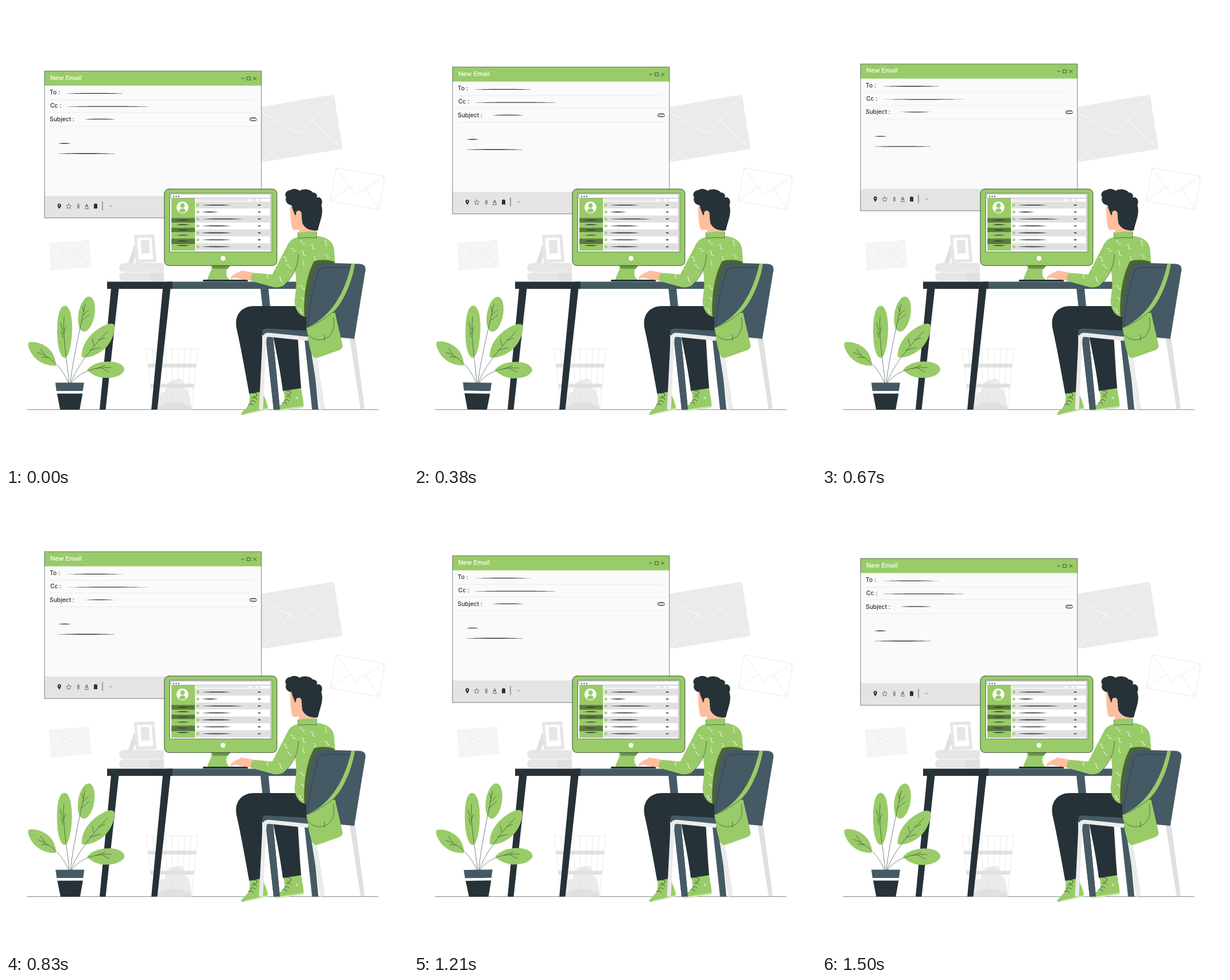
Recreate the animation shown at these times as an HTML page. Size 700 px wide and 800 px high, loop 1.54 s.

```html
<!DOCTYPE html>
<html lang="en">
<head>
<meta charset="utf-8">
<title>New email</title>
<style>
html, body { margin: 0; width: 100%; height: 100%; overflow: hidden; background: #fff; }
svg { display: block; width: 700px; height: 800px; }
text { font-family: Inter, "Open Sans", sans-serif; font-size: 10.3px; font-weight: 500; fill: #263238; }
.g { fill: #99cb68; }
.d { fill: #263238; }
.s { fill: #455a64; }
.sh { fill: #4c6534; }
.skin { fill: #ffbe9d; }
.w { fill: #fff; }
.l1 { fill: #ebebeb; }
.l2 { fill: #e0e0e0; }
.l3 { fill: #e6e6e6; }
.ln { fill: none; stroke: #263238; stroke-width: .8; stroke-linecap: round; stroke-linejoin: round; }
.thin { stroke-width: .6; }
.wl { fill: none; stroke: #fff; stroke-width: .9; stroke-linecap: round; }
.gl { fill: none; stroke: #e4e4e4; stroke-width: .8; }
</style>
</head>
<body>
<svg viewBox="0 0 700 800" xmlns="http://www.w3.org/2000/svg">
  <!-- floor -->
  <path class="ln thin" d="M37 703.400H648"/>

  <!-- envelopes -->
  <path class="l1" d="M431 178L571 154.500L586 249L446 272Z"/>
  <path class="wl" d="M431 178L512 222.500L571 155M446 272L495 212M586 249L532 199"/>
  <path class="gl" d="M575 282L659 297L650 355L565 340ZM575 282L608.500 328.500L659 297M565 340L599 315M650 355L627 319"/>
  <path fill="#f5f5f5" d="M75 413L144.500 407.500L149 455L78 461Z"/>
  <path class="gl" d="M75 413L114 433.500L144.500 407.500M78 461L102 428M149 455L122 428"/>

  <!-- books and picture frame -->
  <path class="l2" d="M223 417L213 448H221L228 430Z"/>
  <path class="l3" d="M223 399L258 398L262 446L226 448Z"/>
  <path class="w" d="M228 404.500L253 403.500L256.500 441L231 442Z"/>
  <path class="l3" d="M234.500 408.500L249 407.500L250.500 431L236 432Z"/>
  <path class="l3" d="M275 448H204Q197 449 197 456T204 463.500H275Z"/>
  <path class="l3" d="M275 464.500H204Q197 465 197 472T204 479.500H275Z"/>
  <path class="l2" d="M275 464.500H254Q248 466 248 472T254 479.500H275Z"/>

  <!-- bin -->
  <path class="l1" d="M264 703C262 684 266 672 277 672C277 659 286 650 296 651C306 645 313 659 312 667C321 672 322 688 323 703Z"/>
  <path class="l2" d="M265 703C266 694 276 690 285 691C300 688 316 692 322 703Z"/>
  <path id="bars" class="gl"/>
  <path class="l2" d="M247 623.500H331.500L331 630H248ZM251 658.500H327.500L327 665H252ZM256 697H322.500L322 703.500H257Z"/>

  <!-- message window -->
  <g id="win">
    <path fill="#fafafa" d="M67 113.500H445V369.500H67Z"/>
    <path fill="#e4e4e4" d="M67 331H445V369.500H67Z"/>
    <path class="g" d="M67 113.500H445V139H67Z"/>
    <path class="ln thin" d="M67.400 113.500H444.700V369.500H67.400Z"/>
    <path class="gl" style="stroke:#e8e8e8" d="M76 163.500H432M76 185.600H440M76 209.600H438"/>
    <text x="77" y="129" style="fill:#fff;font-size:11px">New Email</text>
    <text x="76" y="154.200">To :</text>
    <text x="77" y="177.600">Cc :</text>
    <text x="76" y="201">Subject :</text>
    <g id="lines"></g>
    <path class="ln" d="M410 126.500H414.500M420 123.800H425.500V129.200H420ZM430.500 124L436 129.200M436 124L430.500 129.200"/>
    <path class="ln" d="M434.500 199.500H428Q426 199.200 426 197.700T428 196H434Q436.700 196.200 436.700 198T434 200.400H427Q424.300 200 424.300 197.500T427 194.800H435"/>
    <path class="d" fill-rule="evenodd" d="M92.800 354C90.500 350.500 89.700 349 89.700 347.700A3.100 3.100 0 0 1 95.900 347.700C95.900 349 95 350.500 92.800 354ZM92.800 346.500a1.200 1.200 0 1 0 .01 0Z"/>
    <path id="star" class="ln thin"/>
    <path class="ln thin" d="M124.600 347V352.500Q125.800 354.500 127.200 352.500V346Q125.800 343.500 124.500 346M126 347V351.500"/>
    <path class="ln" d="M138 351.300L140.500 345.200L143 351.300M139 349.200H142M137.500 353.400H143.800"/>
    <path class="d" d="M153 345.500H154.500V344.500H157.500V345.500H159V353.300H153Z"/>
    <path class="ln" d="M168 341.500V356" style="stroke:#555;stroke-width:1"/>
    <path class="ln thin" d="M180.200 348.300L182 349.700L183.800 348.300"/>
  </g>

  <!-- desk -->
  <path class="d" d="M183 492H196.500L173.500 703.500H163ZM273 492H286.500L263.500 703.500H253Z"/>
  <path class="s" d="M443 492H457L477 703.500H466ZM510 492H524L544 703.500H533Z"/>
  <path class="s" d="M280 480.500H524V493H280Z"/>
  <path class="d" d="M176 480.500H290V493H176Z"/>

  <!-- monitor -->
  <path class="g" d="M358 452H391C382 457 381 471 390 478H351C351 469 358 466 358 452Z"/>
  <path style="fill:#6d9449" d="M357 452H391L386 458H361Z"/>
  <path class="d" d="M343 477H421V480.300H343Z"/>
  <rect class="g" x="275.500" y="318.800" width="196.500" height="133.800" rx="8"/>
  <rect class="ln" x="275.800" y="319" width="196" height="133.400" rx="8"/>
  <circle class="w" cx="378" cy="439.700" r="4.200"/>
  <path class="w" d="M285.500 326.300H462.800V428.700H285.500Z"/>
  <path class="ln thin" d="M285.500 326.300H462.800V428.700H285.500Z"/>
  <path class="g" d="M288 335H329V426.500H288Z"/>
  <path class="ln" style="stroke-width:.4" d="M287.500 328H460.500V334.800H287.500ZM460.500 335V427"/>
  <path class="d" d="M291 332a1.100 1.100 0 1 0 2.200 0a1.100 1.100 0 1 0-2.200 0M295.200 332a1.100 1.100 0 1 0 2.200 0a1.100 1.100 0 1 0-2.200 0M299.400 332a1.100 1.100 0 1 0 2.200 0a1.100 1.100 0 1 0-2.200 0"/>
  <circle class="w" cx="307.300" cy="351" r="10.300"/>
  <path class="g" d="M303.300 347.800a4 4 0 1 1 8 0a4 4 0 1 1-8 0M301.500 358.500Q302 352.500 307.300 352.500T313 358.500Q307.500 361.500 301.500 358.500Z"/>
  <path fill="#5c7a3f" d="M288 369.500H329V377.500H288ZM288 386.500H329V394H288ZM288 405.500H329V415H288Z"/>
  <path class="l2" d="M331 336.500H422.500V339.500H331ZM427 336.500H435.500V339.500H427ZM439 336.500H443.500V339.500H439Z"/>
  <g id="rows"></g>

  <!-- legs and shoes -->
  <path class="g" d="M483 671L514 665C515 678 519 688 518 699L472 706Q466 704 472 699C486 692 487 685 483 671Z"/>
  <path class="g" d="M424 676L447 671C449 682 455 689 456 701L411 713Q407 711 413 706C424 697 425 690 424 676Z"/>
  <path fill="#cfe6b8" d="M408.500 712.500L456 700.500V703L432 709ZM466 704.500L518 697V700L476 706Z"/>
  <path class="ln" d="M430 675Q436 673 437 677T431 681M428 684Q432 679 437 686M426 690Q431 685 434 691M422 695Q428 691 430 696M489 671Q496 669 496 674T490 677M488 681Q492 677 496 683M485 688Q490 683 493 689M481 692Q486 688 489 694"/>
  <circle cx="506.500" cy="683" r="2" fill="#cfe6b8"/>
  <path class="d" d="M462 560L507 562C510 600 511 635 514 666L482 671C477 630 470 600 462 560Z"/>
  <path class="d" d="M525 523H432C409 523 397 540 401.500 562C410 600 417 640 423.500 676L448 671.500L446 573L525 568Z"/>
  <path class="ln thin" style="stroke:#44525a" d="M428 553Q437 562 449 566"/>
  <path class="s" d="M452 577H465L477 703.500H466Z"/>

  <!-- head -->
  <path class="skin" d="M495 340C494 362 496 383 499 389Q504 391.500 510.500 389L509.500 397L540 395L538 365L515 335Z"/>
  <path class="d" d="M497.500 347C489 347 485 338 488 334C484 328 488 321 495 321C500 317 508 319 511 322C519 317 531 320 534 325C541 325 544 332 540 334C548 331 553 339 549 347C554 361 546 376 543 391C530 393 519 387 515.500 377L514.500 362L504 368C503 362 498 353 497.500 347Z"/>
  <circle class="skin" cx="509.700" cy="361.500" r="4.800"/>
  <path class="skin" d="M503.500 364L514 362L516 379L503 378Z"/>

  <!-- shirt and hand -->
  <path class="skin" d="M430 464.500L410 461C402 466 393 468 391 474Q391 477 394 476L397 472.500Q397 475 401 473.500L411 476.500L429 478.500Z"/>
  <path class="g" d="M509 403L541 401C559 402 571 411 571.500 426L573 448L545 475L527 541C514 545 502 530 502.500 513C505 495 507 477 503 461C497 473 491 481 482 488Q475 491.500 466 490L426 479Q426 468 431 465L463.500 468L490 417C495 407 501 404 509 403Z"/>
  <path class="g" d="M508 395Q525 392 541 393.500L540.500 404Q525 403 509 405Z"/>
  <path class="ln thin" d="M508 395L509 404.500Q525 403 540.500 404L541 393.500M509.500 433C508 445 506 455 503 461C499 470 493 479 486 485"/>
  <g id="squig"></g>
  <path class="sh" d="M519.500 541C517 502 526 461 537 444.500Q555 440 573 446L545 470L527 544Z"/>

  <!-- chair and bag -->
  <path d="M535 598L551.500 703" stroke="#ebebeb" stroke-width="8.500"/>
  <path class="l2" d="M598.500 579H608L624.500 702L617.500 703Z"/>
  <path class="s" d="M446 568Q447 562 454 562L525 566V580L458 574L448 577Z"/>
  <path d="M526 580L457 573Q450 573 450 582L444 703" fill="none" stroke="#ebebeb" stroke-width="7"/>
  <path class="s" d="M523 563C522 522 531 472 539 456Q543 447 553 447.500L617 449.500Q627 451 626 460L606.500 580L572 577Z"/>
  <path class="ln thin" d="M526 561C526 528 536 493 541 472Q544 456 555 455.500L603 456M606 456C597 489 582 518 567 537"/>
  <path class="g" d="M601.500 449L607.500 449.500C602 484 586 519 568 535L573 534.500L586 591Q587 597 580 600L543 613Q536 615 533 608C528 594 526 583 526 575L523 561C565 543 590 501 601.500 449Z"/>
  <path class="ln thin" d="M526.500 573C536 583 551 585 562 576C570 569 573 557 570 543M554.500 572.500V582.500M523 561Q548 552 567 535"/>

  <!-- plant -->
  <g id="plant">
    <path class="g" d="M102 613.500C93 611 89 590 89 566C89 541 93 523 102 522.500C111 523 115.500 541 115 566C114 590 110 611 102 613.500Z"/>
    <ellipse class="g" cx="140" cy="537" rx="14" ry="31" transform="rotate(10 140 537)"/>
    <path class="g" d="M132 612C131 595 140 577 160 563C176 552 187 551 189 557C190 570 183 588 169 600C154 611 141 614 132 612Z"/>
    <path class="g" d="M87 627C69 628 52 619 44 605C38 595 37 587 41 586C56 584 75 593 82 607Q87 617 87 627Z"/>
    <path class="g" d="M141 634C151 622 169 618 187 620C201 622 207 629 206 635C202 644 188 649 170 648C158 647 147 641 141 634Z"/>
    <path class="ln thin" d="M110 657C107 620 98 580 101 542M99 578L96 566M99.500 572L104 560M98.500 565L94.500 552M112 657C116 620 127 570 138 519M131 549L145 538M134 539L144 529M135 533L133 524M113 657C122 631 148 596 177 567M146 600L164 595M153 591L150 580M161 582L172 578M109 657C99 634 82 613 55 604M74 613L62 612M68 609L60 598M114 657C130 636 154 629 183 630M158 632L172 626M167 631L180 638"/>
    <path class="s" d="M86 656.500H136L134 671H88Z"/>
    <path class="w" d="M88 671H134L133 676H89Z"/>
    <path class="d" d="M89 675.500H133.500L128.500 703.500H94.500Z"/>
  </g>
</svg>
<script>
const $ = id => document.getElementById(id);
const LOOP = 1540, LEAD = 55;

// A stroke that thins out towards both ends
const taper = (x1, x2, y, h = 0.9) => {
  const q = (x2 - x1) / 4;
  return `<path class="d" d="M${x1} ${y}C${x1 + q} ${y - h} ${x2 - q} ${y - h} ${x2} ${y}C${x2 - q} ${y + h} ${x1 + q} ${y + h} ${x1} ${y}Z"/>`;
};

$("lines").innerHTML = [
  [105, 205, 152.6], [105, 249, 175.4], [137, 190, 197.4], [91, 113, 239.7], [90, 191, 257.5]
].map(a => taper(...a)).join("");

$("rows").innerHTML = [393, 370, 414, 393, 392, 393, 393].map((end, i) => {
  const y = 347 + i * 12.1;
  const band = i % 2 ? "" : `<path class="l2" d="M329.500 ${y - 6}H459.500V${y + 6}H329.500Z"/>`;
  const box = `<rect class="g" x="332.300" y="${y - 2}" width="4" height="4"/>`;
  return band + box + taper(340, end, y, 1.1) + taper(438, 444, y, 1.2);
}).join("") + [373.3, 381.3, 390.3, 399.3, 409.6, 417.5].map(y => taper(296, 320, y)).join("");

$("squig").innerHTML = [
  [516, 412], [534, 420], [557, 413], [500, 425], [518, 431], [538, 441], [559, 436],
  [487, 441], [518, 448], [493, 454], [478, 476], [455, 470], [518, 511],
  [513, 531], [533, 459], [516, 490]
].map(([x, y], i) =>
  `<path class="wl" transform="translate(${x} ${y}) rotate(${i % 3 * 20})" d="M-4.500 -2C-2.500 -4 0 -3 0 0S2.500 4 4.500 2"/>`
).join("");

let bars = "M244 597H334L323 703H256Z";
for (let i = 1; i < 8; i++) bars += `M${244 + i * 11.25} 597L${256 + i * 8.4} 703`;
$("bars").setAttribute("d", bars);

$("star").setAttribute("d", "M" + Array.from({ length: 10 }, (_, i) => {
  const a = i * Math.PI / 5, r = i % 2 ? 2.2 : 4.6;
  return `${109.2 + r * Math.sin(a)} ${349.5 - r * Math.cos(a)}`;
}).join("L") + "Z");

function draw(t) {
  const p = (t + LEAD) % LOOP / LOOP;
  const rise = 1 - Math.abs(2 * p - 1);
  const sway = p < .25 ? 4 * p : p < .75 ? 2 - 4 * p : 4 * p - 4;
  $("win").setAttribute("transform", `translate(0 ${.8 - 14.2 * rise})`);
  $("plant").setAttribute("transform", `rotate(${sway} 123 605)`);
}

let start;
function tick(now) {
  start ??= now;
  draw(now - start);
  requestAnimationFrame(tick);
}
draw(0);
requestAnimationFrame(tick);
</script>
</body>
</html>
```
